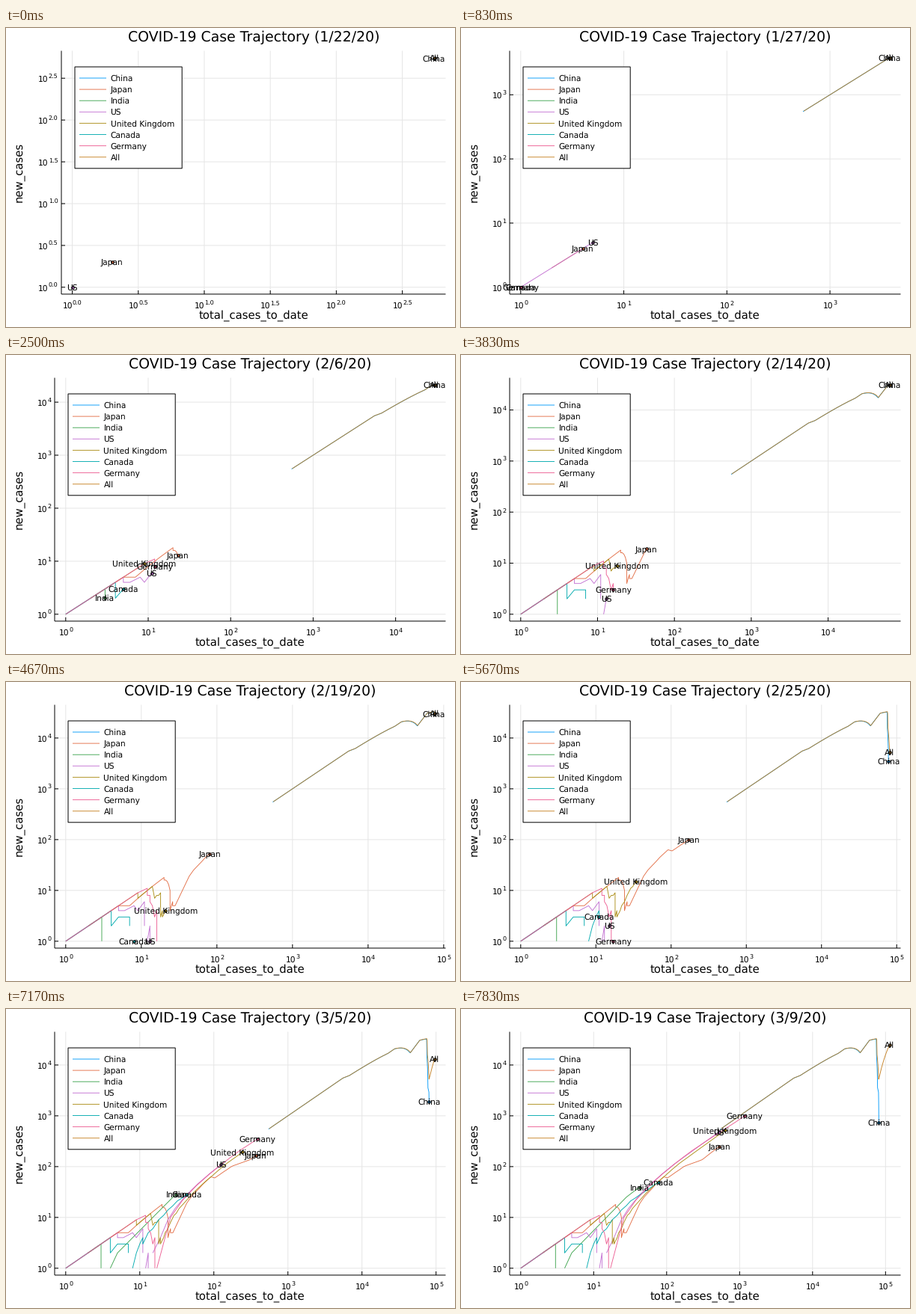
A matplotlib script for the animation above (8000 ms loop, 600 px wide and 400 px high).

```python
import numpy as np
import matplotlib.pyplot as plt
from matplotlib.animation import FuncAnimation
from matplotlib.patches import Rectangle

W, H = 600, 400
DAYS = 48
LOOP, TICK = 8000, 50          # ms
DAY_MS = LOOP / DAYS
LEAD = 33.4                    # ms, puts a day's start on the tick grid
WINDOW = 7
PT = 0.72                      # points per pixel at 100 dpi
EXP, SMALL, MEDIUM, LARGE = 8.0, 10.63, 14.9, 18.85
TOP, BOTTOM, RIGHT = 30.5, 356, 587.5

plt.rcParams.update({"font.family": "DejaVu Sans", "text.hinting": "none"})


def growth(*points):
    """Whole case counts growing geometrically between (day, total) points."""
    days, values = np.transpose(points)
    t = np.arange(DAYS)
    total = np.round(np.exp(np.interp(t, days, np.log(values))))
    return np.where(t < days[0], 0, total)


china = growth((0, 548), (6, 5509), (14, 27440), (21, 44759), (22, 59895),
               (27, 74211), (34, 77754), (40, 80136), (47, 80860))
abroad = growth((0, 9), (10, 147), (27, 925), (34, 2659), (47, 32730))
japan = growth((0, 2), (3, 2), (10, 20), (12, 20), (15, 23), (22, 28),
               (23, 43), (34, 170), (39, 256), (47, 530))
india = growth((8, 1), (12, 3), (39, 3), (41, 5), (42, 28), (47, 43))
us = growth((0, 1), (4, 5), (8, 5), (10, 8), (12, 11), (19, 11), (22, 13),
            (29, 13), (30, 15), (36, 15), (39, 30), (47, 519))
uk = growth((9, 2), (10, 2), (11, 8), (16, 9), (17, 14), (23, 18), (27, 19),
            (34, 34), (39, 94), (47, 634))
canada = growth((4, 1), (8, 2), (9, 4), (13, 4), (15, 5), (16, 7), (25, 7),
                (27, 8), (34, 11), (39, 24), (47, 77))
germany = growth((5, 1), (6, 4), (8, 4), (12, 12), (15, 12), (20, 16),
                 (33, 16), (34, 17), (39, 130), (47, 1176))


def trajectory(total):
    """Log totals and log weekly cases; NaN on days without new cases."""
    new = total.copy()
    new[WINDOW:] -= total[:-WINDOW]
    ok = new > 0
    logs = np.full((2, DAYS), np.nan)
    logs[:, ok] = np.log10([total[ok], new[ok]])
    return logs


PATHS = [(name, trajectory(total), color) for name, total, color in (
    ("China", china, "#009afa"),
    ("Japan", japan, "#e36f47"),
    ("India", india, "#3ea44e"),
    ("US", us, "#c371d2"),
    ("United Kingdom", uk, "#ac8e18"),
    ("Canada", canada, "#00aaae"),
    ("Germany", germany, "#ed5e93"),
    ("All", china + abroad, "#c68225"),
)]


def date(day):
    month, d = 1, 22 + day
    for length in (31, 29):
        if d > length:
            month, d = month + 1, d - length
        else:
            break
    return f"{month}/{d}/20"


def ticks(top):
    """Tick values from zero up to the axis end, with their labels."""
    if top >= 3:
        return [(v, f"{v}") for v in range(int(top) + 1)]
    return [(v, f"{v:.1f}") for v in np.arange(0, top, 0.5)]


fig = plt.figure(figsize=(6, 4), dpi=100, facecolor="white")
ax = fig.add_axes([0, 0, 1, 1])


def line(x, y, color="black", width=1.0, z=2):
    ax.plot(x, y, color=color, lw=width * PT, zorder=z, snap=False,
            solid_capstyle="butt", solid_joinstyle="round")


def text(x, y, s, size, ha="center", z=6, **kw):
    ax.text(x, y, s, fontsize=size * PT, ha=ha, va="baseline", color="black",
            zorder=z, **kw)


def power(x, y, exponent, align):
    """Power of ten; align is the share of its width left of x."""
    digit = 0.636              # advance of a figure, in ems
    base = 2 * digit * SMALL
    raised = (digit * len(exponent) - 0.318 * exponent.count(".")) * EXP
    start = x - align * (base + raised)
    text(start, y, "10", SMALL, ha="left")
    text(start + base, y - 4.3, exponent, EXP, ha="left")


def draw_axes(left, xs, ys, px, py):
    for v, label in xs:
        x = px(v)
        line([x, x], [TOP, BOTTOM], "#e6e6e6", 1, 1)
        line([x, x], [BOTTOM, BOTTOM - 5])
        power(x, 375, label, 0.5)
    for v, label in ys:
        y = py(v)
        line([left, RIGHT], [y, y], "#e6e6e6", 1, 1)
        line([left, left + 5], [y, y])
        power(left - 4.5, y + 4.7, label, 1)
    line([left, left], [TOP, BOTTOM])
    line([left, RIGHT], [BOTTOM, BOTTOM])


def draw_legend(left):
    ax.add_patch(Rectangle((left + 18, 52), 143.2, 135.8, fc="white",
                           ec="black", lw=PT, zorder=7, snap=False))
    for i, (name, _, color) in enumerate(PATHS):
        y = 67 + 15.1 * i
        line([left + 24, left + 60], [y, y], color, 0.9, 8)
        text(left + 65.5, y + 4, name, SMALL, ha="left", z=8)


def draw_day(day):
    ax.clear()
    ax.set(xlim=(0, W), ylim=(H, 0))
    ax.axis("off")

    # limits run 3% past the data on each side
    xmax, ymax = np.nanmax([p[:, :day + 1] for _, p, _ in PATHS], axis=(0, 2))
    xs, ys = ticks(1.03 * xmax), ticks(1.03 * ymax)
    left = 74 if "." in ys[0][1] else 65

    def px(v):
        return left + (RIGHT - left) * (v / xmax + 0.03) / 1.06

    def py(v):
        return BOTTOM - (BOTTOM - TOP) * (v / ymax + 0.03) / 1.06

    draw_axes(left, xs, ys, px, py)
    mid = (left + RIGHT) / 2
    text(mid, 17.7, f"COVID-19 Case Trajectory ({date(day)})", LARGE)
    text(mid, 388.7, "total_cases_to_date", MEDIUM)
    text(20.7, (TOP + BOTTOM) / 2, "new_cases", MEDIUM, rotation=90,
         rotation_mode="anchor")

    for name, path, color in PATHS:
        x, y = px(path[0, :day + 1]), py(path[1, :day + 1])
        line(x, y, color, 0.9, 3)
        if np.isfinite(y[-1]):
            ax.plot(x[-1], y[-1], "o", ms=3.5 * PT, mfc=color, mec="black",
                    mew=PT, zorder=4)
            text(x[-1], y[-1] + 3.9, name, SMALL)
    draw_legend(left)


shown = {"day": None}


def update(i):
    """Redraw only when the frame falls on a new day."""
    day = min(int((i * TICK + LEAD) / DAY_MS), DAYS - 1)
    if day != shown["day"]:
        draw_day(day)
        shown["day"] = day
    return []


def reset():
    shown["day"] = None
    return update(0)


anim = FuncAnimation(fig, update, frames=LOOP // TICK, interval=TICK,
                     init_func=reset, repeat=True, repeat_delay=0)
plt.show()
```
